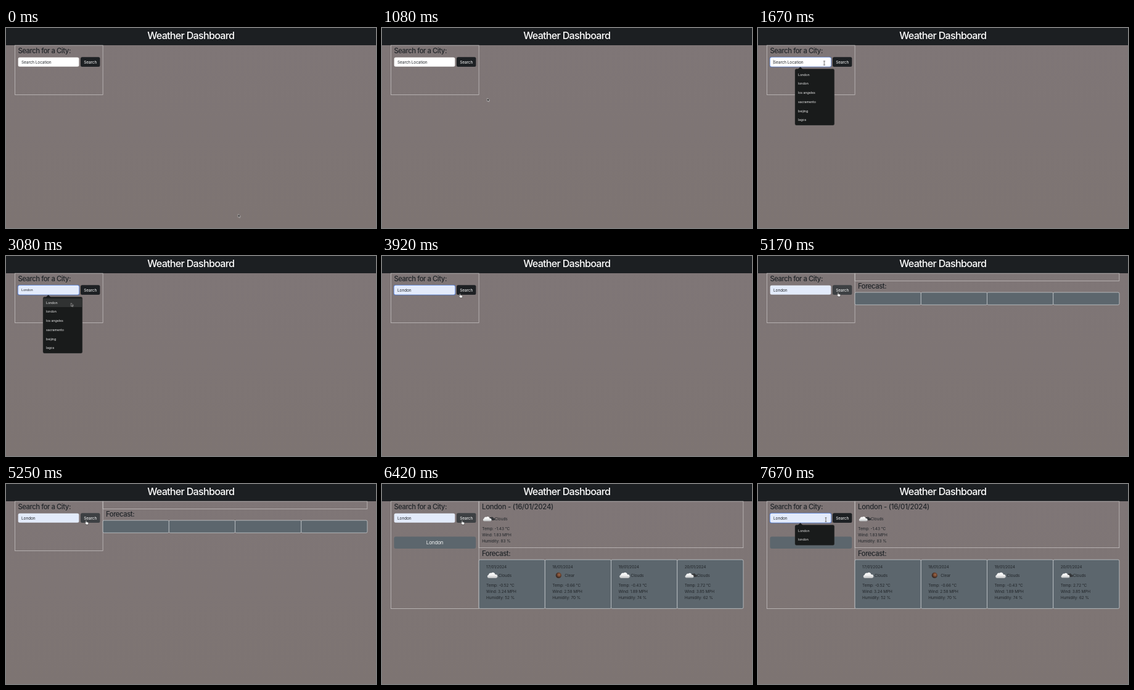
An HTML page that plays this animation: 600x325 px, repeating every 8 s.

```html
<!DOCTYPE html>
<html lang="en">
<head>
<meta charset="utf-8">
<title>Weather Dashboard</title>
<style>
html, body { margin: 0; width: 100%; height: 100%; overflow: hidden; background: #7e7574; }
svg { display: block; width: 600px; height: 325px; font: 6.46px Inter, "Liberation Sans", sans-serif; letter-spacing: -.01em; fill: #212529; }

.title { font-size: 16.1px; font-weight: 500; letter-spacing: -.044em; fill: #fff; text-anchor: middle; }
.heading { font-size: 11.3px; font-weight: 500; letter-spacing: -.041em; }
.dated { letter-spacing: -.02em; }
.small { font-size: 5.3px; }
.light { fill: #fff; }
.history { font-size: 8px; letter-spacing: -.02em; fill: #f4f5f5; text-anchor: middle; }
.frame { fill: none; stroke: #c3bfbf; stroke-width: .8; }
.card { fill: #5c666d; stroke: #c5cacd; stroke-width: .8; }
.menu rect, .menu path { fill: #191b1b; stroke: #3d3d3d; stroke-width: .4; }
.menu path { stroke: none; }
.menu text { fill: #ececec; }
.menu .pick { fill: #303232; stroke: none; }

/* One shared 8 s clock: 1% = 80 ms */
[style*="--k"] { animation: var(--k) 8s step-end infinite; }
.menu, .pick, .preview, .value, .caret, .loading, .results, .icons, .beam, .hand { visibility: hidden; }
.ring { opacity: 0; animation: ring 8s linear infinite; }
.field { fill: #fff; animation: field 8s linear infinite; }
.button { fill: #1d2023; animation: button 8s linear infinite; }
.pointer { animation: move 8s ease-in-out infinite; }

@keyframes menu { 20.75% { visibility: visible } 40.8% { visibility: hidden } }
@keyframes filtered { 90.6% { visibility: visible } }
@keyframes pick { 35.2% { visibility: visible } 40.8% { visibility: hidden } }
@keyframes hint { 0% { visibility: visible } 35.2%, 100% { visibility: hidden } }
@keyframes preview { 35.2% { visibility: visible } 40.8% { visibility: hidden } }
@keyframes value { 40.8% { visibility: visible } }
@keyframes caret { 20.75% { visibility: visible } 25.9% { visibility: hidden } 32.2% { visibility: visible } 35.2% { visibility: hidden } }
@keyframes idle { 0% { visibility: visible } 66.5%, 100% { visibility: hidden } }
@keyframes loading { 63.4% { visibility: visible } 66.5% { visibility: hidden } }
@keyframes results { 66.5% { visibility: visible } }
@keyframes icons { 68.6% { visibility: visible } }
@keyframes arrow {
  0% { visibility: visible } 17.6% { visibility: hidden } 33.4% { visibility: visible }
  47.8% { visibility: hidden } 82.9% { visibility: visible } 83.9%, 100% { visibility: hidden }
}
@keyframes beam { 17.6% { visibility: visible } 33.4% { visibility: hidden } 83.9% { visibility: visible } }
@keyframes hand { 47.8% { visibility: visible } 82.9% { visibility: hidden } }
@keyframes ring {
  0%, 20% { opacity: 0 } 21%, 59.2% { opacity: 1 }
  61.5%, 86.4% { opacity: 0 } 88.5%, 100% { opacity: 1 }
}
@keyframes field { 0%, 35.2% { fill: #fff } 38.3%, 100% { fill: #e3ebfb } }
@keyframes button { 0%, 49% { fill: #1d2023 } 51%, 82.9% { fill: #3d4043 } 85%, 100% { fill: #1d2023 } }
@keyframes move {
  0%, 3.6% { transform: translate(376.5px, 302.5px) }
  6.25%, 8.8% { transform: translate(223.5px, 161.5px) }
  18.75%, 31.6% { transform: translate(107.5px, 57px) }
  36.5%, 43% { transform: translate(105.5px, 76.5px) }
  49%, 52.6% { transform: translate(126.5px, 61px) }
  54.1%, 81% { transform: translate(129.7px, 59px) }
  85.4%, 100% { transform: translate(110px, 58px) }
}
</style>
</head>
<body>
<svg viewBox="0 0 600 325">
  <defs>
    <linearGradient id="wall" x2="0" y2="1"><stop stop-color="#7f7677"/><stop offset="1" stop-color="#7d7472"/></linearGradient>
    <linearGradient id="puff" x2="0" y2="1"><stop stop-color="#fff"/><stop offset=".55" stop-color="#eeeeee"/><stop offset="1" stop-color="#b9bcbe"/></linearGradient>
    <radialGradient id="ball" cx=".6" cy=".4"><stop stop-color="#a06a4c"/><stop offset=".6" stop-color="#70452f"/><stop offset="1" stop-color="#3c2b25"/></radialGradient>
    <path id="puffs" d="M-6 4.5a2.6 2.6 0 0 1-.4-5.1a3.4 3.4 0 0 1 4.6-3a3.8 3.8 0 0 1 6.3 2.4a2.9 2.9 0 0 1 1.5 5.7Z"/>
    <use id="cloud" href="#puffs" fill="url(#puff)"/>
    <g id="broken">
      <use href="#puffs" fill="#35373a" transform="translate(5 -.2) scale(.62)"/>
      <use href="#puffs" fill="url(#puff)" transform="translate(-2.2 .3) scale(.84)"/>
    </g>
    <circle id="clear" r="4.6" fill="url(#ball)"/>
  </defs>

  <rect width="600" height="325" fill="url(#wall)"/>
  <rect width="600" height="28" fill="#1c1f22"/>
  <text class="title" x="299.7" y="18.2">Weather Dashboard</text>

  <rect class="frame" style="--k:idle" x="14.5" y="28.2" width="142.6" height="80.3"/>
  <g class="loading" style="--k:loading">
    <rect class="frame" x="157.1" y="28.2" width="428.7" height="12.3"/>
    <text class="heading" x="162" y="53.3">Forecast:</text>
    <g id="blanks"></g>
  </g>
  <g class="results" style="--k:results">
    <rect class="frame" x="14.5" y="28.2" width="142.6" height="174.3"/>
    <rect x="19.5" y="85.5" width="132.7" height="19.6" rx="3" fill="#5c666d"/>
    <text class="history" x="85.6" y="98.3">London</text>
    <rect class="frame" x="157.1" y="28.2" width="428.7" height="75.4"/>
    <text class="heading dated" x="162" y="41.3">London - (16/01/2024)</text>
    <text class="heading" x="162" y="117.3">Forecast:</text>
    <g id="report"></g>
  </g>
  <g class="icons" style="--k:icons" id="icons"></g>

  <text class="heading" x="19.5" y="41.3">Search for a City:</text>
  <rect class="ring" x="18.9" y="46.9" width="100.2" height="16.7" rx="3.2" fill="#4a78d6"/>
  <rect class="field" x="19.7" y="47.7" width="98.6" height="15.1" rx="2.5"/>
  <text style="--k:hint" x="25" y="57.5">Search Location</text>
  <text class="preview small" style="--k:preview" x="25" y="57.2">London</text>
  <text class="value" style="--k:value" x="25" y="57.5">London</text>
  <rect class="caret" style="--k:caret" x="24.8" y="51.7" width=".5" height="7"/>
  <rect class="button" x="121" y="47.3" width="31.4" height="15.6" rx="2.5"/>
  <text class="light" x="126.2" y="57.5">Search</text>

  <g id="menus"></g>

  <g class="pointer">
    <path style="--k:arrow" d="M0 0V5.2L1.3 4.1 2.2 6 3 5.6 2.2 3.8H3.9Z" fill="#111" stroke="#fff" stroke-width=".5"/>
    <g class="beam" style="--k:beam" fill="none">
      <path d="M-1.3-3.2H1.3M0-3.2V3.2M-1.3 3.2H1.3" stroke="#fff" stroke-width="1.4"/>
      <path d="M-1.3-3.2H1.3M0-3.2V3.2M-1.3 3.2H1.3" stroke="#222" stroke-width=".7"/>
    </g>
    <path class="hand" style="--k:hand" d="M0 0c.6 0 .7.4.7.8V2.6l2.4.6c.7.2.9.7.8 1.3L3.5 7H.3L-1.6 4.4c-.4-.7.3-1 .8-.6L-.6 4V.8C-.6.3-.4 0 0 0Z" fill="#fff" stroke="#222" stroke-width=".5"/>
  </g>
</svg>
<script>
const fill = (id, markup) => { document.getElementById(id).innerHTML = markup; };
const text = (x, y, label, cls = "") => `<text class="${cls}" x="${x}" y="${y}">${label}</text>`;
const icon = (name, x, y) => `<use href="#${name}" x="${x}" y="${y}"/>`;

const forecast = [
  { day: 17, sky: "Clouds", art: "cloud", temp: "-0.52", wind: "3.24", wet: 52 },
  { day: 18, sky: "Clear", art: "clear", temp: "-0.66", wind: "2.58", wet: 70 },
  { day: 19, sky: "Clouds", art: "cloud", temp: "-0.43", wind: "1.89", wet: 74 },
  { day: 20, sky: "Clouds", art: "broken", temp: "2.72", wind: "3.85", wet: 62 },
];
const cardWidth = 107.2;
const cardX = i => 157.1 + i * cardWidth;
const card = (i, y, height) =>
  `<rect class="card" x="${cardX(i)}" y="${y}" width="${cardWidth}" height="${height}" rx="2"/>`;

const readings = (x, y, { temp, wind, wet }) =>
  text(x, y, `Temp: ${temp} °C`) +
  text(x, y + 9.9, `Wind: ${wind} MPH`) +
  text(x, y + 19.8, `Humidity: ${wet} %`);

fill("blanks", forecast.map((_, i) => card(i, 59.1, 20.2)).join(""));

fill("report",
  text(182.7, 59.2, "Clouds") +
  readings(162.3, 74.9, { temp: "-1.43", wind: "1.83", wet: 83 }) +
  forecast.map((f, i) => {
    const x = cardX(i);
    return card(i, 123, 79.4) +
      text(x + 12, 136.9, `${f.day}/01/2024`) +
      text(x + 32, 151.3, f.sky) +
      readings(x + 12, 167.1, f);
  }).join(""));

fill("icons", icon("broken", 173, 56.5) +
  forecast.map((f, i) => icon(f.art, cardX(i) + 22, 148.4)).join(""));

const menu = (key, items, height) => `<g class="menu" style="--k:${key}">
  <rect x="60" y="66.6" width="63.8" height="${height}" rx="2.5"/>
  <path d="M64.6 66.9L68.6 63.2 72.6 66.9Z"/>
  ${key === "menu" ? '<rect class="pick" style="--k:pick" x="60.3" y="68.8" width="63.2" height="14.2"/>' : ""}
  ${items.map((item, i) => text(65, 77.7 + i * 14.7, item, "small")).join("")}
</g>`;

fill("menus",
  menu("menu", ["London", "london", "los angeles", "sacramento", "beijing", "lagos"], 91.4) +
  menu("filtered", ["London", "london"], 32.9));
</script>
</body>
</html>
```
